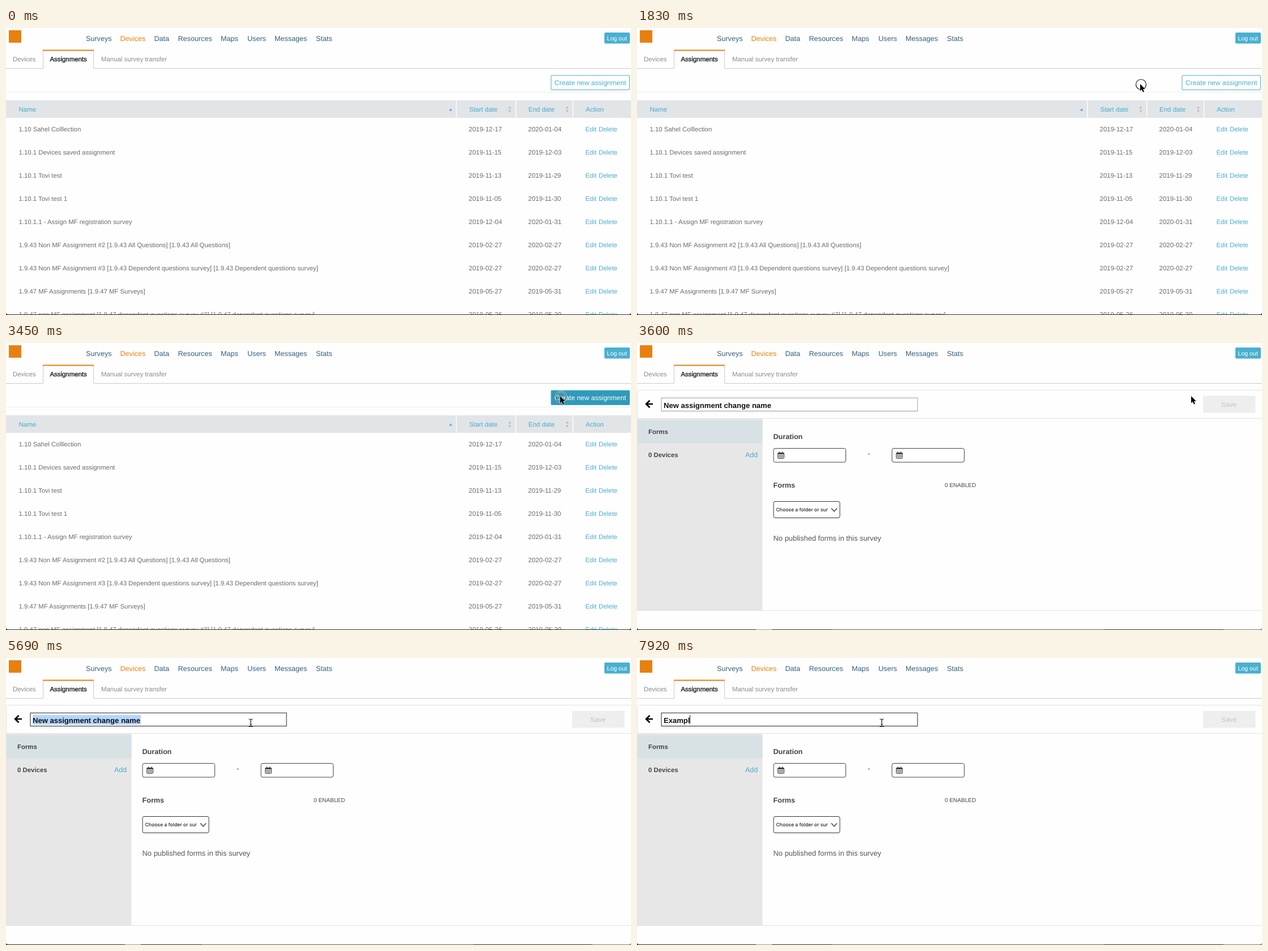
Animation, 1103 px wide and 508 px high, one loop 8000 ms. Source, as an HTML page:

```html
<!DOCTYPE html>
<html lang="en">
<head>
<meta charset="utf-8">
<title>Assignments</title>
<style>
  html, body { margin: 0; width: 100%; height: 100%; overflow: hidden; background: #fefefe; }
  svg { display: block; width: 100%; height: 100%; }
  text {
    font-family: "Liberation Sans", Arial, sans-serif;
    text-rendering: geometricPrecision;
    white-space: pre;
  }
</style>
</head>
<body>
<svg id="stage" viewBox="0 0 1103 508"></svg>
<script>
const LOOP = 8000;
const TEAL = '#47adcb', NAVY = '#33607f', ORANGE = '#e8800f', BODY = '#6c6c6c', DARK = '#444';
const BG = '#fefefe';
const stage = document.getElementById('stage');

function add(parent, tag, attrs, content) {
  const node = document.createElementNS('http://www.w3.org/2000/svg', tag);
  for (const key in attrs) node.setAttribute(key, attrs[key]);
  if (content !== undefined) node.textContent = content;
  parent.append(node);
  return node;
}
const group = (parent = stage) => add(parent, 'g', {});
const rect = (p, x, y, width, height, fill, more) =>
  add(p, 'rect', { x, y, width, height, fill, ...more });
const path = (p, d, more) => add(p, 'path', { d, fill: 'none', ...more });
const text = (p, str, x, y, size, fill, more) =>
  add(p, 'text', { x, y, 'font-size': size, fill, ...more }, str);
const bold = { 'font-weight': 700 };

// Window edge along the bottom
const edge = group();
rect(edge, 0, 500, 1103, 8, '#2b2b2b');
const edgeParts = group(edge);
rect(edgeParts, 210, 500, 28, 8, '#9a9a9a');
rect(edgeParts, 345, 500, 480, 8, '#5c5c5c');
rect(edgeParts, 1035, 500, 68, 8, '#777');
const clip = add(add(stage, 'defs', {}), 'clipPath', { id: 'window' });
rect(clip, 0, -10, 1103, 517, '#000', { rx: 4 });
const win = add(stage, 'g', { 'clip-path': 'url(#window)' });
rect(win, 0, 0, 1103, 508, BG);

function drawHeader(p) {
  rect(p, 5, 4, 22, 22, ORANGE);
  [['Surveys', 141], ['Devices', 201.5], ['Data', 261.5], ['Resources', 303.5], ['Maps', 379],
   ['Users', 426], ['Messages', 474], ['Stats', 547]].forEach(([name, x]) =>
    text(p, name, x, 23, 12.6, name === 'Devices' ? ORANGE : NAVY));
  rect(p, 1056, 8, 45, 19.5, '#49b0cf', { rx: 2 });
  text(p, 'Log out', 1060.5, 21.5, 10.6, '#fff');
  path(p, 'M0 71.5H65.5V40M154.5 40V71.5H1103', { stroke: '#cbcbcb' });
  rect(p, 65, 38.5, 90, 2, ORANGE);
  text(p, 'Devices', 12, 59, 11.4, '#8a8a8a');
  text(p, 'Assignments', 77.5, 59, 11.4, '#222', { stroke: '#222', 'stroke-width': 0.4 });
  text(p, 'Manual survey transfer', 168, 59, 11.4, '#8a8a8a');
}

const rows = [
  ['1.10 Sahel Colllection', '2019-12-17', '2020-01-04'],
  ['1.10.1 Devices saved assignment', '2019-11-15', '2019-12-03'],
  ['1.10.1 Tovi test', '2019-11-13', '2019-11-29'],
  ['1.10.1 Tovi test 1', '2019-11-05', '2019-11-30'],
  ['1.10.1.1 - Assign MF registration survey', '2019-12-04', '2020-01-31'],
  ['1.9.43 Non MF Assignment #2 [1.9.43 All Questions] [1.9.43 All Questions]', '2019-02-27', '2020-02-27'],
  ['1.9.43 Non MF Assignment #3 [1.9.43 Dependent questions survey] [1.9.43 Dependent questions survey]', '2019-02-27', '2020-02-27'],
  ['1.9.47 MF Assignments [1.9.47 MF Surveys]', '2019-05-27', '2019-05-31'],
  ['1.9.47 non MF assignment [1.9.47 dependent questions survey #3] [1.9.47 dependent questions survey]', '2019-05-26', '2019-05-30']
];

function drawList(p) {
  rect(p, 0, 113, 1103, 1, '#eee');
  rect(p, 0, 128, 1103, 31, '#e1e5e8');
  for (const x of [794, 899, 1000]) rect(p, x, 128, 1.3, 31, '#fff');
  [['Name', 22.5], ['Start date', 817.5], ['End date', 922], ['Action', 1023]].forEach(([name, x]) =>
    text(p, name, x, 148, 11.5, TEAL));
  path(p, 'M782 146.5l2.7-4.5 2.7 4.5z', { fill: '#56a9dc' });
  for (const x of [889, 990.5])
    path(p, `M${x - 2.7} 142.5l2.7-4 2.7 4zM${x - 2.7} 145.5l2.7 4 2.7-4z`, { fill: '#b9bdc0' });
  rows.forEach(([name, start, end], i) => {
    const y = 182.6 + 41 * i;
    text(p, name, 22.5, y, 11.35, BODY);
    text(p, start, 816.5, y, 11.5, BODY);
    text(p, end, 921.5, y, 11.5, BODY);
    text(p, 'Edit', 1022.5, y, 11.4, TEAL);
    text(p, 'Delete', 1046, y, 11.4, TEAL);
  });
}

function drawDateBox(p, x) {
  rect(p, x + 0.5, 186.5, 127.5, 24.5, '#fff', { rx: 3, stroke: '#444' });
  const g = add(p, 'g', { transform: `translate(${x + 7.5} 192)` });
  rect(g, 0.5, 2.5, 11, 10, 'none', { rx: 1, stroke: '#444' });
  rect(g, 0.5, 2.5, 11, 2.5, '#444');
  path(g, 'M3.5 0.5v3M8.5 0.5v3', { stroke: '#444', 'stroke-width': 1.8 });
  path(g, 'M0.5 7.5h11M0.5 10h11M3.2 5v7.5M6 5v7.5M8.8 5v7.5', { stroke: '#444', 'stroke-width': 0.7 });
}

function drawForm(p) {
  path(p, 'M0.5 473.5V87.5a4 4 0 0 1 4-4H1103M0.5 133.5H1103M0.5 473.5H1103', { stroke: '#e2e2e2' });
  rect(p, 1, 134, 220.5, 339, '#e7e7e7');
  rect(p, 1, 136.5, 220.5, 41, '#d8e2e4');
  path(p, 'M22.5 101.8L16.2 108L22.5 114.2M17 108H28', { stroke: '#000', 'stroke-width': 2.7 });
  rect(p, 999, 93.5, 92.5, 30, '#eee');
  text(p, 'Save', 1031, 112.8, 11.9, '#c4c4c4');
  text(p, 'Forms', 20, 161.3, 11.4, DARK, bold);
  text(p, '0 Devices', 20, 201.8, 11.4, DARK, bold);
  text(p, 'Add', 191, 201.8, 12.4, TEAL);
  text(p, 'Duration', 240.5, 170.3, 12.6, DARK, bold);
  drawDateBox(p, 240.5);
  drawDateBox(p, 449.5);
  text(p, '-', 407, 199.5, 13, DARK);
  text(p, 'Forms', 240.5, 255.8, 12.6, DARK, bold);
  text(p, '0 ENABLED', 543, 255.3, 10.05, DARK);
  rect(p, 241, 280.5, 117, 29, '#fff', { rx: 3, stroke: '#333' });
  text(p, 'Choose a folder or sur', 245.5, 298.3, 8.6, '#222',
    { style: 'font-family:Inter,sans-serif', 'font-weight': 500 });
  path(p, 'M343 292.5l5 5.5 5-5.5', { stroke: '#333', 'stroke-width': 1.3 });
  text(p, 'No published forms in this survey', 240.5, 350, 12.95, '#555');
}

function drawMenu(p) {
  for (let i = 3; i > 0; i--)
    rect(p, 41.5 - i / 2, 124, 314.5 + i, 75 + i, '#000', { rx: 4, opacity: 0.07 });
  path(p, 'M41.5 123H356V195a4 4 0 0 1-4 4H45.5a4 4 0 0 1-4-4z', { fill: '#fff' });
  text(p, 'ET Bensa HV Phone [Bensa School Survey]', 52, 149.3, 11.32, '#1c1c1c', bold);
  text(p, 'ET Bokore Hebano Software [Health Facility Survey]', 52, 180.7, 11.43, '#1c1c1c', bold);
}

drawHeader(win);

const list = group(win);
drawList(list);
const button = rect(list, 962, 84, 138.5, 25.5, '#fff', { rx: 1, stroke: TEAL });
const buttonText = text(list, 'Create new assignment', 968, 100.8, 12.03, TEAL);

const form = group(win);
drawForm(form);
const field = rect(form, 43, 97.2, 452, 23.3, '#fff');
const selection = rect(form, 47, 101, 191, 17, '#b3d6fd');
const fieldText = text(form, '', 47, 114.5, 13.05, '#111', bold);
const caret = rect(form, 0, 101, 1, 16, '#111');
const menu = group(form);
drawMenu(menu);

const pointer = group();
const ring = group(pointer);
for (const [stroke, width] of [['#fff', 2.6], ['#1a1a1a', 1.2]])
  add(ring, 'circle', { cx: 1.5, cy: 1, r: 9, fill: 'none', stroke, 'stroke-width': width });
const arrow = path(pointer, 'M0 0V12.4L2.8 9.8L4.9 14.4L7 13.5L5 9H8.8Z',
  { fill: '#000', stroke: '#fff', 'stroke-width': 1, 'paint-order': 'stroke' });
const beam = path(pointer, 'M-3.5-6.5Q-0.5-6.5 0-5Q0.5-6.5 3.5-6.5M0-5V5.5M-3.5 7Q-0.5 7 0 5.5Q0.5 7 3.5 7M-1.5 3H1.5',
  { stroke: '#000', 'stroke-width': 1.1 });

// Each table row: start time, then the values held until the next row
const pointerSteps = [
  [0], [900, 761, 486], [1080, 791, 149], [1370, 862, 105], [1520, 886, 99],
  [1680, 888, 99, 'click'], [1960, 888, 99], [2100, 922, 98], [2250, 952, 97], [2400, 967, 96],
  [2550, 978, 94], [3450, 978, 94, 'click'], [3600, 978, 94],
  [4200, 948, 76], [4350, 820, 66], [4500, 640, 73], [4650, 505, 96],
  [4800, 437, 114.5, 'beam'], [5240, 432, 114.5, 'beam']
];
const TITLE = 'New assignment change name';
const fieldSteps = [
  [0, TITLE], [5390, TITLE, 203], [5540, TITLE, 47], [7040, 'Ex'], [7330, 'Exa'],
  [7630, 'Exam'], [7780, 'Examp'], [7920, 'Exampl']
];
const at = (steps, t) => steps.findLast(step => step[0] <= t);
const show = (node, on) => node.setAttribute('display', on ? 'inline' : 'none');

function render(t) {
  const isForm = t >= 3600;
  show(list, !isForm);
  show(form, isForm);
  show(edgeParts, isForm);

  const hover = t >= 2400;
  button.setAttribute('fill', hover ? '#2f9aba' : '#fff');
  buttonText.setAttribute('fill', hover ? '#fff' : TEAL);

  const [, value, from] = at(fieldSteps, t);
  fieldText.textContent = value;
  field.setAttribute('stroke', t >= 4800 ? '#222' : '#9a9a9a');
  show(selection, from);
  if (from) {
    selection.setAttribute('x', from);
    selection.setAttribute('width', 238 - from);
  }
  const typing = t >= 7040;
  show(caret, typing);
  if (typing) caret.setAttribute('x', 46.5 + fieldText.getComputedTextLength());
  show(menu, t >= 6890 && t < 7040);

  const [, x, y, mode] = at(pointerSteps, t);
  show(pointer, x !== undefined);
  if (x !== undefined) pointer.setAttribute('transform', `translate(${x} ${y})`);
  show(ring, mode === 'click');
  show(arrow, mode !== 'beam');
  show(beam, mode === 'beam');
}

const begin = performance.now();
function tick() {
  render((performance.now() - begin) % LOOP);
  requestAnimationFrame(tick);
}
tick();
</script>
</body>
</html>
```
